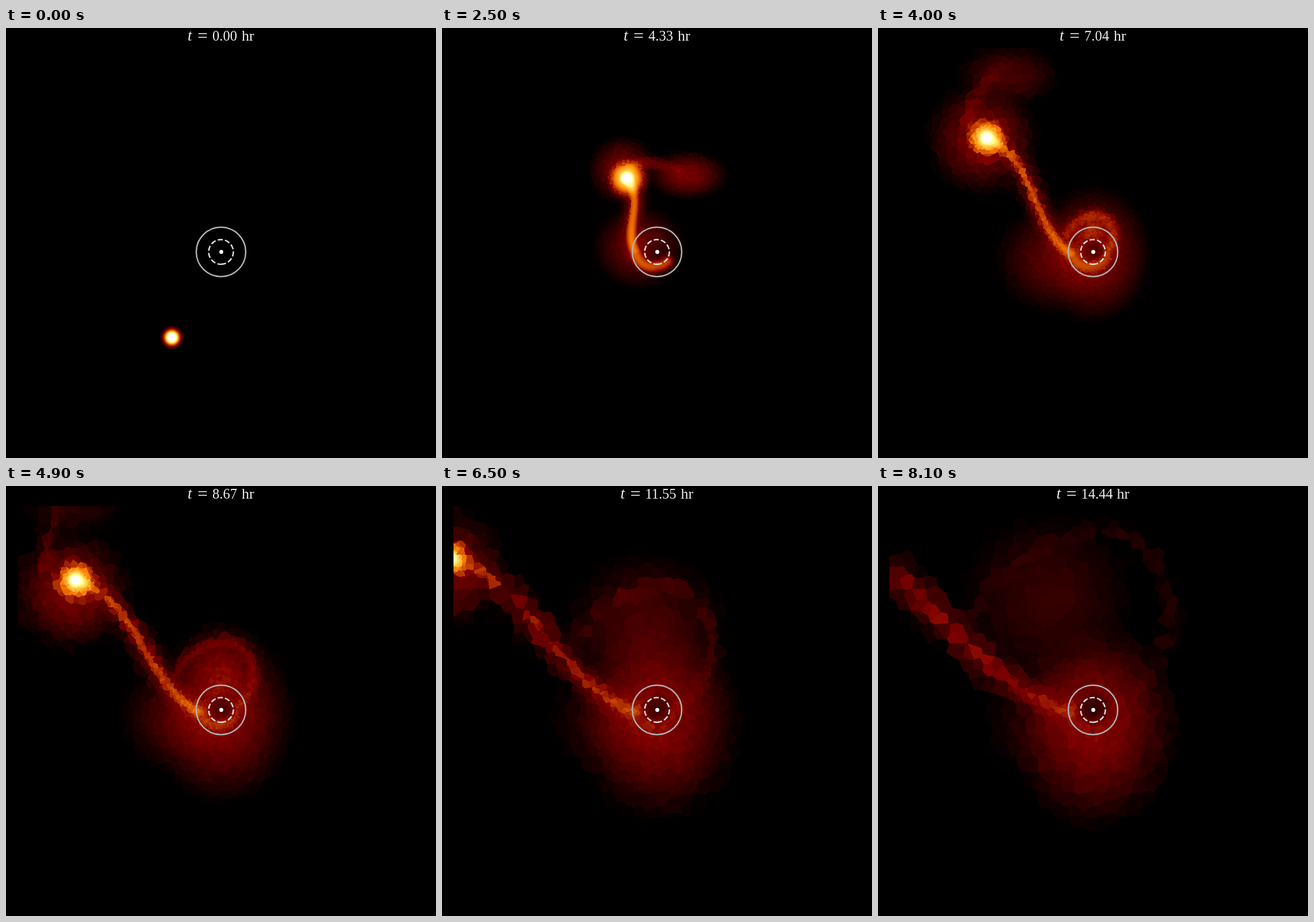
An HTML page with a canvas that plays this animation: 748 px wide and 748 px high, repeating every 8200 ms.

```html
<!DOCTYPE html>
<html lang="en">
<head>
<meta charset="utf-8">
<title>Tidal stripping of a star</title>
<style>
  html, body { margin: 0; width: 100%; height: 100%; overflow: hidden; background: #000; }
  canvas { position: absolute; left: 20px; top: 35px; }
  svg { position: absolute; left: 0; top: 0; }
  text { fill: #eee; font: 24.5px "Liberation Serif", "Noto Serif", serif; }
</style>
</head>
<body>
<canvas id="gas" width="540" height="590"></canvas>
<svg width="748" height="748" viewBox="0 0 748 748">
  <g id="left">
    <text x="316" y="22" style="font-style:italic;font-size:27px">t</text>
    <text x="333" y="23.5" style="font-size:32px">=</text>
    <text id="hours" x="359" y="22">0.00</text>
  </g>
  <g id="right"><text x="410" y="22" style="font-size:26px">hr</text></g>
  <g fill="none" stroke-width="2.5">
    <circle cx="374" cy="389.5" r="43" stroke="#b0b0b0"/>
    <path d="M374 411a21.5 21.5 0 0 0 0-43a21.5 21.5 0 0 0 0 43" stroke="#dcdcdc" stroke-dasharray="8.93 3.86"/>
  </g>
  <circle cx="374.5" cy="389.5" r="3.4" fill="#fff"/>
</svg>
<script>
const LOOP = 8200, X0 = 20, Y0 = 35, W = 540, H = 590;
const HOLE = { x: 374, y: 389 }, PERI = 43, RAD = Math.PI / 180;
const $ = id => document.getElementById(id);
const ctx = $('gas').getContext('2d');
const image = ctx.createImageData(W, H);
const field = new Float32Array(W * H);
const clamp = (v, lo = 0, hi = 1) => Math.min(hi, Math.max(lo, v));
const mix = (a, b, u) => a + (b - a) * u;
const ramp = (k, from, to) => clamp((k - from) / (to - from));
const smooth = u => u * u * (3 - 2 * u);
const from = (p, x, y) => ({ x: p.x + x, y: p.y + y });
const polar = (p, r, a) => from(p, r * Math.cos(a), r * Math.sin(a));

// Parabolic orbit: solve D + D^3/3 = m.
function starAt(k) {
  const m = -3.46 + .2525 * k;
  const a = Math.cbrt((3 * m + Math.sqrt(9 * m * m + 4)) / 2);
  const d = a - 1 / a;
  return from(HOLE, PERI * (1 - d * d), -2 * PERI * d);
}

function eachIn(p, rx, ry, paint) {
  const x = p.x - X0, y = p.y - Y0;
  const xa = Math.max(0, Math.ceil(x - rx)), xb = Math.min(W - 1, x + rx);
  const ya = Math.max(0, Math.ceil(y - ry)), yb = Math.min(H - 1, y + ry);
  for (let j = ya; j <= yb; j++) {
    const dy = ((j - y) / ry) ** 2;
    for (let i = xa; i <= xb; i++) {
      const f = 1 - dy - ((i - x) / rx) ** 2;
      if (f > 0) paint(j * W + i, f * Math.sqrt(f));
    }
  }
}

// Clouds add up in quadrature.
function cloud(p, rx, ry, amp) {
  eachIn(p, rx, ry, (i, f) => { field[i] = Math.hypot(field[i], amp * f); });
}

// Streams are runs of overlapping discs along path(s), s = 0..1.
function stream(path, width, ampAt, end = 1) {
  for (let s = 0; s <= end; s += 1 / 120) {
    const amp = ampAt(s);
    eachIn(path(s), width, width, (i, f) => { field[i] = Math.max(field[i], amp * f); });
  }
}

function bezier(...pts) {
  return s => {
    let row = pts;
    while (row.length > 1)
      row = row.slice(1).map((p, i) => ({ x: mix(row[i].x, p.x, s), y: mix(row[i].y, p.y, s) }));
    return row[0];
  };
}

// S-shaped bridge from the star to the hole.
function bridgePath(star, k) {
  const end = polar(HOLE, 39, (235 - 60 * ramp(k, 15, 25)) * RAD);
  const dx = end.x - star.x, dy = end.y - star.y, len = Math.hypot(dx, dy);
  const along = (u, side) => from(star, dx * u + dy / len * side, dy * u - dx / len * side);
  return bezier(star, along(1 / 3, Math.min(.2 * len, 60)), along(2 / 3, -.12 * len), end);
}

// Gas circles the hole, then swings out into a growing loop.
function spiralPath(reach) {
  return s => {
    const a = 175 - 320 * s;
    const inner = 24 + 15 * clamp((a - 90) / 90) + 8 * clamp(-a / 50);
    const outer = reach * (1 - .15 * clamp((-a - 90) / 55));
    return polar(HOLE, mix(inner, outer, smooth(clamp(-a / 85))), a * RAD);
  };
}

// Far tail; it swings round the star while that passes the hole.
function armPath(star, k) {
  const late = Math.max(0, k - 31), early = Math.max(0, 31 - k);
  const turn = .125 * early, size = Math.max(.4, 1 - .03 * early);
  const at = (x, y) => polar(star, size * Math.hypot(x, y), Math.atan2(y, x) + turn);
  const tip = at(57 - 4.8 * late, -96 - 2.6 * late);
  const path = bezier(at(-13 - 2.2 * late, -25), at(-10 - 2.6 * late, -60 - 2 * late), tip);
  return { path, tip, size };
}

function fillField(k) {
  field.fill(0);
  const star = starAt(k), begun = ramp(k, 9, 15), spread = ramp(k, 8, 42);
  const fade = (start, life) => Math.exp(-Math.max(0, k - start) / life);

  if (begun) {
    const bridge = bridgePath(star, k), arm = armPath(star, k);
    const width = mix(15, 21, ramp(k, 30, 80)), glow = .43 - .0035 * (k - 31);
    const reach = Math.max(35, 6 * k - 168), swirl = .4 * fade(31, 32);
    stream(bridge, 2 * width, () => .17 * begun);
    stream(bridge, width, () => glow * begun);
    stream(arm.path, 18, s => (.24 - .1 * s) * begun * fade(31, 40));
    stream(spiralPath(reach), 17, s => swirl * mix(1, .75, s), ramp(k, 15, 37));

    cloud(from(arm.tip, 18, 8), 95 * arm.size, 58 * arm.size, .23 * begun * fade(31, 16));

    const fall = smooth(ramp(k, 15, 31)), fan = 55 + 53 * fall + .6 * Math.max(0, k - 31);
    cloud(from(HOLE, mix(15, -65, fall), mix(-38, 12, fall)), fan, fan * .9, .2 * begun * fade(31, 60));

    const halo = 160 * (1 - fade(26, 12));
    if (halo) cloud(from(HOLE, 0, (k - 31) / 2), halo, 1.2 * halo, .25);

    const bubble = Math.min(160, .7 * reach);
    cloud(from(HOLE, -.08 * Math.max(0, k - 48) ** 2, -.62 * reach), bubble, bubble,
      .23 * ramp(k, 28, 39) * fade(39, 50));
  }

  const skin = 22 + 90 * spread, hot = 22 + 24 * ramp(k, 8, 28);
  cloud(from(star, -8 * begun, clamp(2 * (k - 39), -18, 18) * ramp(k, 9, 29)), skin, skin, .23);
  cloud(star, hot, hot, .7);
  cloud(star, 15, 15, .9);

  const pit = 24 + .25 * Math.max(0, k - 31), depth = .35 + .006 * (k - 31);
  eachIn(from(HOLE, 0, -3), pit, pit, (i, f) => { field[i] *= 1 - depth * f; });
}

let seed = 7;
const random = () => (seed = (seed * 16807) % 2147483647) / 2147483647;

// Jittered Voronoi mesh: every pixel knows its nearest cell.
function makeMesh(size) {
  const cols = Math.ceil(W / size), rows = Math.ceil(H / size), n = cols * rows;
  const xs = new Float32Array(n), ys = new Float32Array(n), tint = new Float32Array(n);
  const spot = new Int32Array(n), far = new Float32Array(n), label = new Uint16Array(W * H);
  for (let c = 0; c < n; c++) {
    xs[c] = (c % cols + random()) * size;
    ys[c] = (Math.floor(c / cols) + random()) * size;
    tint[c] = .91 + .18 * random();
    spot[c] = Math.min(H - 1, ys[c] | 0) * W + Math.min(W - 1, xs[c] | 0);
    far[c] = clamp(.38 + Math.hypot(xs[c] + X0 - HOLE.x, ys[c] + Y0 - HOLE.y) / 300, 0, 1.15);
  }
  for (let y = 0; y < H; y++) for (let x = 0; x < W; x++) {
    const cx = x / size | 0, cy = y / size | 0;
    let best = 1e9, id = 0;
    for (let j = Math.max(0, cy - 1); j <= Math.min(rows - 1, cy + 1); j++)
      for (let i = Math.max(0, cx - 1); i <= Math.min(cols - 1, cx + 1); i++) {
        const c = j * cols + i, d = (xs[c] - x) ** 2 + (ys[c] - y) ** 2;
        if (d < best) { best = d; id = c; }
      }
    label[y * W + x] = id;
  }
  return { size, tint, spot, far, label };
}
const meshes = [20, 12, 7, 4].map(makeMesh);

function draw(k) {
  fillField(k);
  const scale = .31 * k, data = image.data;
  for (let p = 0; p < W * H; p++) {
    let v = field[p];
    // Cells grow with time and shrink where the gas is dense.
    for (const m of meshes) {
      const c = m.label[p], cell = field[m.spot[c]];
      if (scale * m.far[c] * (1 - 1.3 * cell) >= m.size * .78) {
        v = cell * m.tint[c];
        break;
      }
    }
    const q = 4 * p;
    data[q] = 510 * v;
    data[q + 1] = 510 * v - 127.5;
    data[q + 2] = 510 * v - 255;
    data[q + 3] = 255;
  }
  ctx.putImageData(image, 0, 0);

  const hours = (k * .18053).toFixed(2), wide = hours.length > 4 ? 5.6 : 0;
  $('hours').textContent = hours;
  $('left').setAttribute('transform', `translate(${-wide})`);
  $('right').setAttribute('transform', `translate(${wide})`);
}

let shown = -1;
const start = performance.now();
function tick() {
  const ms = (performance.now() - start) % LOOP;
  const k = Math.max(0, Math.floor(ms / 100) - 1);
  if (k !== shown) draw(shown = k);
  requestAnimationFrame(tick);
}
tick();
</script>
</body>
</html>
```
